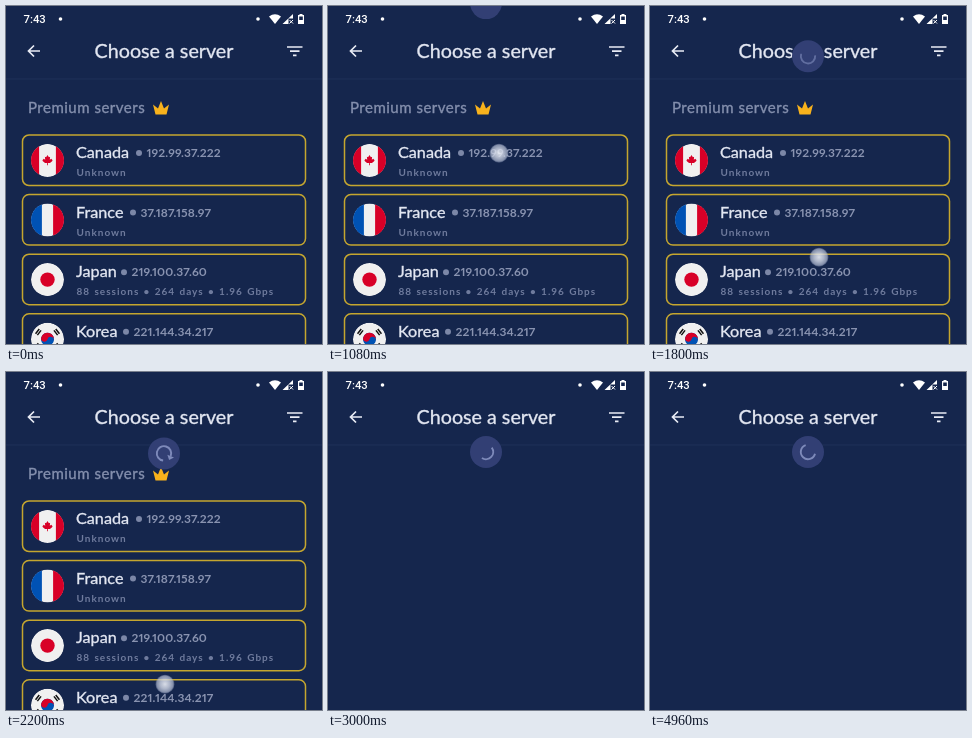
Write an HTML page that moves like this. It is 316 px wide and 338 px high and loops after 5000 ms.

```html
<!DOCTYPE html>
<html lang="en">
<head>
<meta charset="utf-8">
<title>Choose a server</title>
<style>
  html, body { margin: 0; height: 100%; overflow: hidden; background: #15264d; }
  svg { display: block; width: 316px; height: 338px; font-family: Lato, sans-serif; }
  .title, .section, .name { stroke-width: .35px; }
  .title { font-size: 19.7px; fill: #e3e7f2; stroke: #e3e7f2; text-anchor: middle; }
  .clock { font: 500 11.3px Roboto, sans-serif; fill: #fff; }
  .section { font-size: 15px; letter-spacing: .5px; fill: #8590ae; stroke: #8590ae; }
  .name { font-size: 16.2px; fill: #e3e7f2; stroke: #e3e7f2; }
  .ip { font-size: 12px; font-weight: 700; letter-spacing: .1px; fill: #8993b0; font-variant-numeric: proportional-nums; }
  .info { font-size: 10px; font-weight: 700; letter-spacing: 1px; word-spacing: .9px; fill: #6f7b9d; }
  .card { fill: none; stroke: #c5a62f; stroke-width: 1.5; }
  .line { fill: none; stroke: #e9ecf5; stroke-width: 1.7; }
</style>
</head>
<body>
<svg viewBox="0 0 316 338">
  <defs>
    <clipPath id="round"><circle r="16.5"/></clipPath>
    <radialGradient id="glow">
      <stop offset="0" stop-color="#eef1f8" stop-opacity=".9"/>
      <stop offset=".5" stop-color="#d3d9e8" stop-opacity=".8"/>
      <stop offset=".85" stop-color="#b4bdd3" stop-opacity=".7"/>
      <stop offset="1" stop-color="#8d99ba" stop-opacity=".35"/>
    </radialGradient>
  </defs>
  <rect width="316" height="338" fill="#15264d"/>

  <text class="clock" x="17.5" y="17">7:43</text>
  <g fill="#fff">
    <circle cx="54.5" cy="13" r="1.8"/>
    <circle cx="252" cy="13" r="1.8"/>
    <path d="M263 10.500Q269 6 275 10.500L269 18Z"/>
    <path d="M287 8V12.500H282.500V18H276.500Z"/>
    <path d="M283.500 14L287 17.500M287 14L283.500 17.500" stroke="#fff"/>
    <path fill-rule="evenodd" d="M292 9H293.500V8H296.500V9H298V18H292ZM293.200 10.500V14H296.800V10.500Z"/>
  </g>
  <path class="line" d="M34 45H22.500M28 39.500L22.500 45L28 50.500"/>
  <path class="line" d="M281 41H296.500M284 45.200H293.500M287 49.400H290.500"/>
  <text class="title" x="158" y="52">Choose a server</text>
  <path d="M0 73H316" stroke="#1e3059"/>

  <g id="list">
    <text class="section" x="22" y="107">Premium servers</text>
    <path fill="#f8b21c" d="M149.500 108.500L147 98.500L152 102.500L155 95L158 102.500L163 98.500L160.500 108.500Z"/>
  </g>

  <circle id="touch" r="9.500" fill="url(#glow)"/>
  <g id="spinner">
    <circle r="16" fill="#323f74"/>
    <g id="ring">
      <path id="arc" fill="none" stroke="#7e8aba" stroke-width="1.900"/>
      <path id="head" fill="#7e8aba" d="M-3.600 0H3.600L0 4.200Z"/>
    </g>
  </g>
</svg>
<script>
const $ = id => document.getElementById(id);
const LOOP = 5000, CLEAR = 2760, RELEASE = 2840;
const SPIN_START = 2745, SPIN_PERIOD = 1375;

const stripes = (left, right, half) =>
  `<path fill="${left}" d="M-17 -17H${-half}V17H-17Z"/><path fill="${right}" d="M${half} -17H17V17H${half}Z"/>`;

const bars = angle => `<path transform="rotate(${angle})" stroke="#111" stroke-width="1.500"
  d="M-12.800 -3V3M-10.500 -3V3M10.500 -3V3M12.800 -3V3"/>`;

const flags = {
  Canada: stripes('#d80027', '#d80027', 8.4) + `<path fill="#d80027" transform="scale(.82)" d="M0 -6.500L1.700 -3.700L3.200 -4.300
    L2.800 -.8L4.600 -2L6.200 -.2L5.600 1L3 3.300H.5V6H-.5V3.300H-3L-5.600 1L-6.200 -.2L-4.600 -2L-2.800 -.8L-3.200 -4.300L-1.700 -3.700Z"/>`,
  France: stripes('#0052b4', '#d80027', 5.6),
  Japan: '<circle r="7.200" fill="#d80027"/>',
  Korea: bars(38) + bars(-38) + `<g transform="rotate(15)"><circle r="6.500" fill="#0052b4"/>
    <path fill="#d80027" d="M-6.500 0A6.500 6.500 0 0 1 6.500 0A3.250 3.250 0 0 0 0 0A3.250 3.250 0 0 1 -6.500 0Z"/></g>`
};

const servers = [
  ['Canada', '192.99.37.222', 133, 'Unknown'],
  ['France', '37.187.158.97', 127, 'Unknown'],
  ['Japan', '219.100.37.60', 118, '88 sessions • 264 days • 1.96 Gbps'],
  ['Korea', '221.144.34.217', 120, '']
];

$('list').innerHTML += servers.map(([name, ip, dot, info], i) => `
  <g transform="translate(0 ${129 + i * 59.6})">
    <rect class="card" x="16.500" width="283" height="50.500" rx="6.500"/>
    <g transform="translate(41.500 25.400)" clip-path="url(#round)">
      <circle r="16.500" fill="#f0f0f0"/>${flags[name]}
    </g>
    <text class="name" x="70" y="23">${name}</text>
    <circle cx="${dot}" cy="18" r="3" fill="#7c87a7"/>
    <text class="ip" x="${dot + 7.5}" y="22">${ip}</text>
    <text class="info" x="70.500" y="41">${info}</text>
  </g>`).join('');

// Finger positions: time, x, y
const drag = [[760, 171, 108], [1080, 171, 147], [1800, 169, 251], [2200, 159, 312], [2240, 158, 317]];

function fingerAt(t) {
  const i = drag.findIndex(k => k[0] > t);
  if (i < 0) return drag[drag.length - 1].slice(1);
  if (i === 0) return drag[0].slice(1);
  const [a, b] = [drag[i - 1], drag[i]];
  const p = (t - a[0]) / (b[0] - a[0]);
  return [1, 2].map(n => a[n] + (b[n] - a[n]) * p);
}

// cubic-bezier(.4, 0, .2, 1)
function ease(x) {
  if (x <= 0) return 0;
  if (x >= 1) return 1;
  let low = 0, high = 1, s;
  for (let i = 0; i < 20; i++) {
    s = (low + high) / 2;
    if (1.2 * s * (1 - s) ** 2 + .6 * s * s * (1 - s) + s ** 3 < x) low = s; else high = s;
  }
  return s * s * (3 - 2 * s);
}

function drawArc(start, sweep, headScale) {
  const r = 7.2, rad = Math.PI / 180;
  const point = a => `${r * Math.cos(a * rad)} ${r * Math.sin(a * rad)}`;
  const end = start + sweep;
  $('arc').setAttribute('d', `M${point(start)}A${r} ${r} 0 ${sweep > 180 ? 1 : 0} 1 ${point(end)}`);
  $('head').setAttribute('transform', `translate(${point(end)}) rotate(${end}) scale(${headScale})`);
}

function render(t) {
  const [x, y] = fingerAt(t);
  $('list').style.display = t < CLEAR ? '' : 'none';
  $('touch').style.display = t >= 760 && t < RELEASE ? '' : 'none';
  $('touch').setAttribute('transform', `translate(${x} ${y})`);

  const pulled = -3 + (y - 147) * .511;
  const settle = ease((t - 2240) / 300);
  const top = pulled + (80 - pulled) * settle;
  $('spinner').setAttribute('transform', `translate(158 ${top})`);

  if (t < SPIN_START) {
    const sweep = Math.max(4, Math.min(285, 200 + (pulled - 49) * 2.7));
    const full = Math.max(0, Math.min(1, (pulled - 45) / 30));
    drawArc(-10 + (pulled - 49) * 3.3, sweep, full);
    $('ring').setAttribute('opacity', .55 + .45 * full);
  } else {
    const cycles = (t - SPIN_START) / SPIN_PERIOD, p = cycles % 1;
    const head = ease(p * 2) * 284, tail = ease(p * 2 - 1) * 284;
    drawArc(-94 + cycles * 306 + Math.floor(cycles) * 284 + tail, head - tail + 4, 0);
    $('ring').setAttribute('opacity', 1);
  }
}

const began = performance.now();
function tick() {
  render((performance.now() - began) % LOOP);
  requestAnimationFrame(tick);
}
tick();
</script>
</body>
</html>
```
